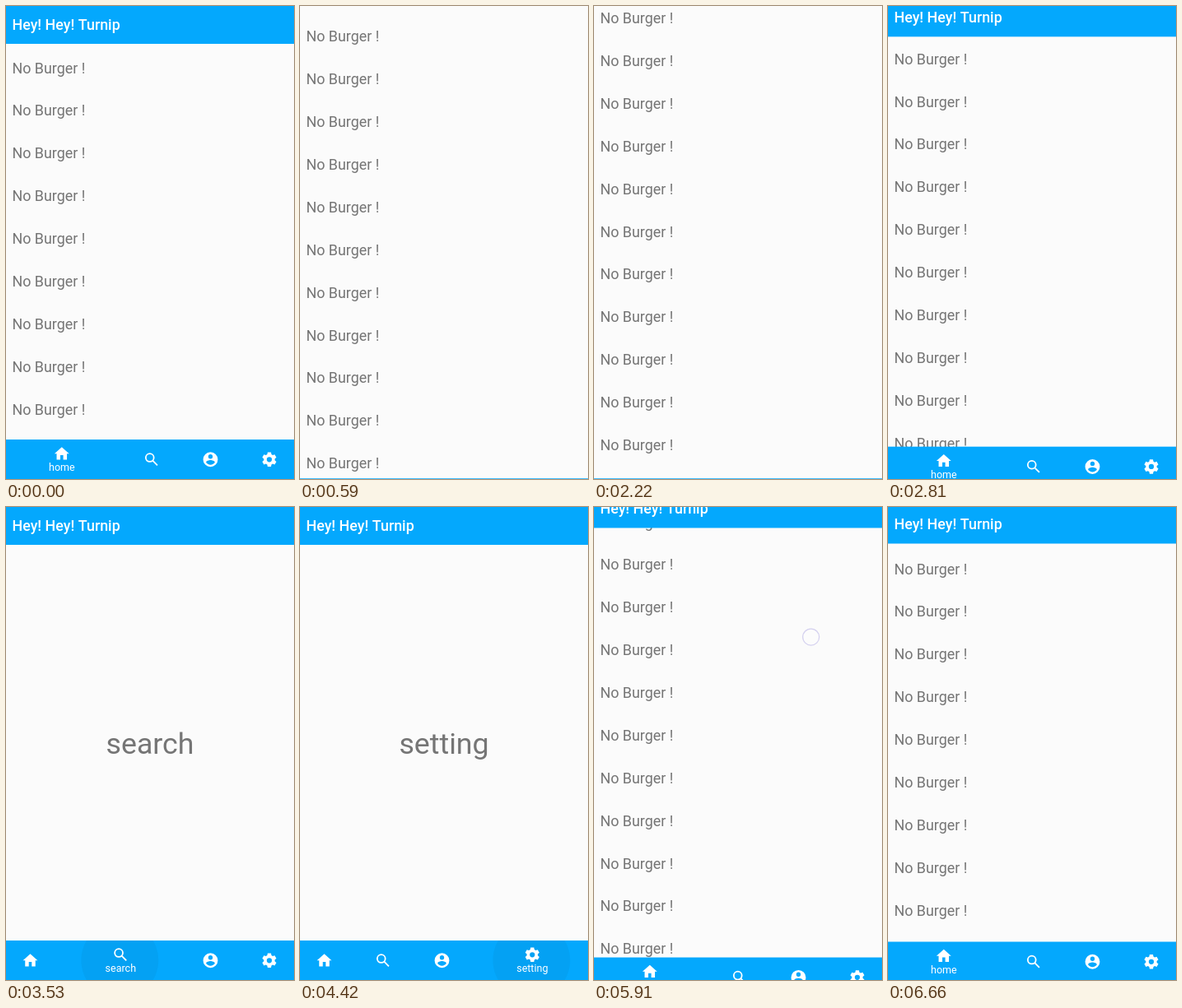
These frames come from a looping animation (350 px wide and 575 px high, 6760 ms). An HTML page with a canvas:

```html
<!DOCTYPE html>
<html lang="en">
<head>
<meta charset="utf-8">
<title>Bottom bar demo</title>
<style>
  html, body { margin: 0; width: 100%; height: 100%; overflow: hidden; background: #fbfbfb; }
  canvas { display: block; width: 100vw; height: 100vh; }
</style>
</head>
<body>
<canvas id="stage"></canvas>
<script>
const W = 350, H = 575, LOOP = 6760;
const STEP = 147.8, LEAD = 19; // the picture advances in even steps
const BLUE = '#04a8fd', PAPER = '#fbfbfb', GREY = '#757575';
const DP = 0.893, HEAD = 46, BAR = 48, BAR_MID = H - BAR / 2;
const ROW = 51.87, FIRST_ROW = 81.6, HIDDEN = 47.25;

// Times are in steps.
const swipes = [
  { at: 1, span: 5, by: 348.3 },
  { at: 8, span: 3, by: 299.7 },
  { at: 13, span: 7, by: -648 },
  { at: 39, span: 3, by: 190 },
  { at: 42, span: 3, by: -190 }
];
const tabs = ['home', 'search', 'user', 'setting'];
const taps = [
  { at: 21, tab: 1 }, { at: 25, tab: 2 }, { at: 28, tab: 3 },
  { at: 32, tab: 2 }, { at: 33, tab: 1 }, { at: 35, tab: 0 }
];

const canvas = document.getElementById('stage');
const ctx = canvas.getContext('2d');
const ratio = window.devicePixelRatio || 1;
canvas.width = W * ratio;
canvas.height = H * ratio;

const clamp = u => Math.min(1, Math.max(0, u));
const easeOut = u => 1 - Math.pow(1 - clamp(u), 2.1);
const moved = (swipe, k) => swipe.by * easeOut((k - swipe.at) / swipe.span);
const scrollAt = k => swipes.reduce((sum, swipe) => sum + moved(swipe, k), 0);
// The bars trail slightly behind the list.
const hideAt = k => Math.min(HIDDEN, 0.34 * scrollAt(k - 0.5));
const lastTap = k => taps.filter(tap => tap.at < k).pop() || { at: -Infinity, tab: 0 };
const tabX = (i, active) => 29.5 + 71.5 * i + (i === active ? 38.3 : i > active ? 76 : 0);

function touchAt(k, active) {
  const tap = taps.find(tap => tap.at === k);
  if (tap) return [tabX(tap.tab, active) + 4, BAR_MID];
  const swipe = swipes.find(swipe => k === swipe.at || k === swipe.at + 1);
  return swipe && [263.7, 267 - moved(swipe, k)];
}

function disc(path, x, y, r) {
  path.moveTo(x + r, y);
  path.arc(x, y, r, 0, 7);
}

function searchPath() {
  const path = new Path2D('M14 14L19.8 19.8');
  disc(path, 9.5, 9.5, 5.5);
  return path;
}

function userPath() {
  const path = new Path2D('M12 19.2c-2.5 0-4.7-1.3-6-3.2 0-2 4-3.1 6-3.1s6 1.1 6 3.1c-1.3 1.9-3.5 3.2-6 3.2z');
  disc(path, 12, 12, 10);
  disc(path, 12, 8, 3);
  return path;
}

function gearPath() {
  const path = new Path2D();
  for (let i = 0; i < 6; i++) {
    const mid = i * Math.PI / 3 - Math.PI / 2;
    for (const [turn, r] of [[-0.39, 7.5], [-0.23, 10], [0.23, 10], [0.39, 7.5]]) {
      path.lineTo(12 + r * Math.cos(mid + turn), 12 + r * Math.sin(mid + turn));
    }
  }
  path.closePath();
  disc(path, 12, 12, 3.5);
  return path;
}

const icons = [new Path2D('M10 20v-6h4v6h5v-8h3L12 3 2 12h3v8z'), searchPath(), userPath(), gearPath()];

function drawIcon(i, x, y) {
  ctx.save();
  ctx.translate(x, y);
  ctx.scale(DP, DP);
  ctx.translate(-12, -12);
  ctx.fillStyle = ctx.strokeStyle = '#fff';
  ctx.lineWidth = 2;
  if (tabs[i] === 'search') ctx.stroke(icons[i]);
  else ctx.fill(icons[i], 'evenodd');
  ctx.restore();
}

function drawText(str, x, y, size, color, align = 'left', weight = 400) {
  ctx.font = `${weight} ${size * DP}px Roboto, sans-serif`;
  ctx.textAlign = align;
  ctx.fillStyle = color;
  ctx.fillText(str, x, y);
}

function drawList(scroll) {
  const first = Math.max(0, Math.floor((scroll - FIRST_ROW) / ROW));
  for (let y = FIRST_ROW - scroll + first * ROW; y < H + 15; y += ROW) {
    drawText('No Burger !', 7.5, y, 20, GREY);
  }
}

function drawHeader(hide) {
  ctx.fillStyle = BLUE;
  ctx.fillRect(0, -hide, W, HEAD);
  drawText('Hey! Hey! Turnip', 7.5, 28.7 - hide, 20, '#fff', 'left', 500);
}

function drawBar(hide, active, ripple) {
  ctx.save();
  ctx.translate(0, hide);
  ctx.fillStyle = BLUE;
  ctx.fillRect(0, H - BAR, W, BAR);
  if (ripple) {
    ctx.save();
    ctx.beginPath();
    ctx.rect(0, H - BAR, W, BAR);
    ctx.clip();
    ctx.beginPath();
    ctx.arc(tabX(active, active) - 1, BAR_MID, 47, 0, 7);
    ctx.fillStyle = 'rgba(0,0,0,0.04)';
    ctx.fill();
    ctx.restore();
  }
  tabs.forEach((name, i) => {
    const x = tabX(i, active), on = i === active;
    drawIcon(i, x, on ? 544.3 : 551.3);
    if (on) drawText(name, x, 565.3, 14, '#fff', 'center');
  });
  ctx.restore();
}

function drawTouch([x, y]) {
  ctx.beginPath();
  ctx.arc(x, y, 10, 0, 7);
  ctx.fillStyle = 'rgba(255,255,255,0.35)';
  ctx.fill();
  ctx.strokeStyle = 'rgba(165,155,225,0.45)';
  ctx.lineWidth = 1.2;
  ctx.stroke();
}

function draw(ms) {
  const k = Math.floor((ms % LOOP + LEAD) / STEP);
  const { at, tab } = lastTap(k);
  const touch = touchAt(k, tab);

  ctx.setTransform(ratio, 0, 0, ratio, 0, 0);
  ctx.fillStyle = PAPER;
  ctx.fillRect(0, 0, W, H);
  if (tab) drawText(tabs[tab], W / 2, 300.3, 40, GREY, 'center');
  else drawList(scrollAt(k));
  drawHeader(hideAt(k));
  drawBar(hideAt(k), tab, !touch && k - at <= 3);
  if (touch) drawTouch(touch);
}

const start = performance.now();
function tick() {
  draw(performance.now() - start);
  requestAnimationFrame(tick);
}
tick();
</script>
</body>
</html>
```
